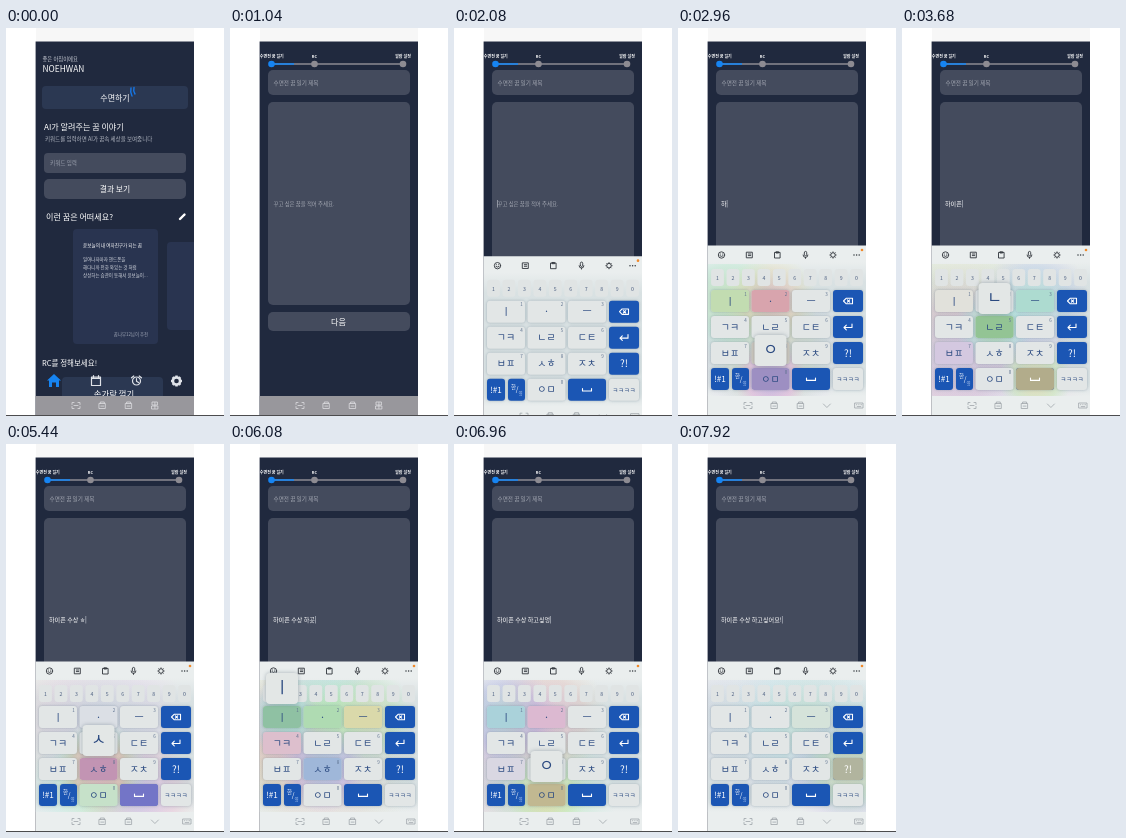
An HTML page with a canvas for the animation above (8 s loop, 218x388 px).

```html
<!DOCTYPE html>
<html lang="ko">
<head>
<meta charset="utf-8">
<style>
html, body { margin: 0; width: 100%; height: 100%; overflow: hidden; background: #fff; }
canvas { display: block; width: 100vw; height: 100vh; }
</style>
</head>
<body>
<canvas id="stage"></canvas>
<script>
const canvas = document.getElementById('stage');
const c = canvas.getContext('2d');
const LOOP = 8000, W = 218, H = 388;
const LEFT = 29.6, TOP = 13.6, WIDE = 158.4;
const FONT = '"Noto Sans CJK KR", "Noto Sans CJK", "Noto Sans", sans-serif';
const NAVY = '#20293e', FIELD = '#444b5d', BLUE = '#1b56b4', INK = '#2b4a80';

const clamp = v => Math.max(0, Math.min(1, v));
const easeOut = v => 1 - (1 - clamp(v)) ** 3;

function box(x, y, w, h, r, fill) {
  c.beginPath();
  c.roundRect(x, y, w, h, r);
  c.fillStyle = fill;
  c.fill();
}

function text(s, x, y, size, fill = '#fff', align = 'left', weight = 400) {
  c.font = `${weight} ${size}px ${FONT}`;
  c.textAlign = align;
  c.textBaseline = 'middle';
  c.fillStyle = fill;
  c.fillText(s, x, y);
}

function dot(x, y, r, fill) {
  c.beginPath();
  c.arc(x, y, r, 0, 7);
  c.fillStyle = fill;
  c.fill();
}

// Stroked icon path centred on (x, y)
function icon(d, x, y, color, width = 1) {
  c.save();
  c.translate(x, y);
  c.strokeStyle = color;
  c.lineWidth = width;
  c.lineJoin = c.lineCap = 'round';
  c.stroke(new Path2D(d));
  c.restore();
}

const circle = r => `M${r} 0A${r} ${r} 0 1 1 ${-r} 0A${r} ${r} 0 1 1 ${r} 0`;
const ICON = {
  calendar: 'M-4.5-4h9v8.5h-9zM-4.5-2.7h9M-2.5-5.5v2M2.5-5.5v2',
  clock: circle(4) + 'M0-2.3V.3L2 1.5M-5-3.2L-2.7-5M5-3.2L2.7-5',
  frame: 'M-4-1v-2h2M2-3h2v2M4 1v2h-2M-2 3h-2v-2M-2 0h4',
  bag: 'M-3-2h6v5h-6zM-2-2v-1.5h4V-2M-1.5.6h3',
  lamp: 'M-2.5-3.5h5v3h-5zM-3 .5h6v3h-6zM0-3v6',
  chevron: 'M-3.5-1.5L0 2L3.5-1.5',
  keys: 'M-4-2.5h8v5h-8zM-2.5-.8h.1M-.8-.8h.1M1-.8h.1M2.5-.8h.1M-1.8 1.1h3.6',
  smile: circle(3.2) + 'M-1.5.8Q0 2.3 1.5.8M-1.1-1v.1M1.1-1v.1',
  note: 'M-2.8-2.8h5.6v5.6h-5.6zM-1.2-1h2.4M-1.2.6h2.4',
  clip: 'M-2.6-2.6h5.2v5.6h-5.2zM-1.2-3.2h2.4v1.2h-2.4z',
  mic: 'M-1.2-2.4a1.2 1.2 0 0 1 2.4 0v2a1.2 1.2 0 0 1-2.4 0zM-2.4 0a2.4 2.4 0 0 0 4.8 0M0 2.4v1',
  back: 'M-4.5 0l2.6-2.7h6.4v5.4h-6.4zM-.6-1.1l2.3 2.3M1.7-1.1l-2.3 2.3',
  enter: 'M4-3v3.5h-8M-1.7-1.8l-2.3 2.3l2.3 2.3',
  space: 'M-4.5-1v2.4h9v-2.4'
};

function gear(x, y, r, color, weight) {
  c.strokeStyle = color;
  c.lineWidth = r * weight;
  c.beginPath();
  c.arc(x, y, r * .65, 0, 7);
  c.stroke();
  for (let i = 0; i < 8; i++) {
    const a = i * Math.PI / 4;
    c.beginPath();
    c.moveTo(x + Math.cos(a) * r * .7, y + Math.sin(a) * r * .7);
    c.lineTo(x + Math.cos(a) * r, y + Math.sin(a) * r);
    c.stroke();
  }
}

function home(t) {
  box(LEFT, TOP, WIDE, H - TOP, 0, NAVY);
  text('좋은 아침이에요', 36.5, 31, 5.3, '#c3c7d0');
  text('NOEHWAN', 36.5, 40.5, 8.4);
  box(36, 58, 146, 23, 4, '#2b3852');
  text('수면하기', 109, 69.5, 8, '#fff', 'center', 500);
  c.globalAlpha = clamp(1 - t / 280);
  icon('M-2-4Q-3 0-1 4M1-4.5Q0-1 2 2', 127, 64, '#1677e8', 1.4);
  c.globalAlpha = 1;

  text('AI가 알려주는 꿈 이야기', 38, 99, 8.1, '#fff', 'left', 500);
  text('키워드를 입력하면 AI가 꿈속 세상을 보여줍니다', 39, 110.5, 5.5, '#b4b9c4');
  box(38, 125, 142, 20, 4, FIELD);
  text('키워드 입력', 44, 135, 5.6, '#9ba1ae');
  box(38, 151, 142, 20, 5, FIELD);
  text('결과 보기', 109, 161, 7.8, '#fff', 'center', 500);

  text('이런 꿈은 어떠세요?', 40, 188.5, 8.1, '#fff', 'left', 500);
  icon('M-2.5 2.5L2 -2', 176.5, 188.5, '#fff', 2.4);
  box(67, 201, 85, 115, 4, '#293450');
  box(161, 214, 27, 88, [4, 0, 0, 4], '#293450');
  text('윤보늘의 내 여자친구가 되는 꿈', 77, 217.5, 4.6, '#fff', 'left', 500);
  ['일어나자마자 핸드폰을', '해다니까 전화 와있는 것 처럼', '상상하는 습관이 동해서 윤보늘이...']
    .forEach((s, i) => text(s, 77, 231.5 + i * 8, 4.5, '#d3d7df'));
  text('꿈나무12님이 추천', 142, 306, 4.4, '#9ca3b3', 'right');

  text('RC를 정해보세요!', 36, 335, 7.5, '#fff', 'left', 500);
  box(56, 349, 101, 39, 4, '#2b3852');
  text('손가락 꺾기', 108, 365.5, 8.4, '#fff', 'center', 500);
  c.fillStyle = '#1684f2';
  c.fill(new Path2D('M48 346L55 352.5H53V359H50V354.5H46V359H43V352.5H41Z'));
  icon(ICON.calendar, 90, 353, '#dfe2e8', 1.2);
  icon(ICON.clock, 130.5, 353, '#dfe2e8', 1.2);
  gear(170.5, 353, 5.5, '#dfe2e8', .45);
}

function diary(entry, caret) {
  box(LEFT, TOP, WIDE, H - TOP, 0, NAVY);
  box(41, 35.3, 132, 1.4, 0, '#8d8b92');
  box(41, 35.2, 23, 1.6, 0, '#1684f2');
  dot(41.5, 36, 3.3, '#1684f2');
  dot(84.5, 36, 3.3, '#8d8b92');
  dot(173, 36, 3.3, '#8d8b92');
  text('수면전 꿈 일기', 41.8, 28, 4, '#fff', 'center', 700);
  text('RC', 84.5, 28, 4, '#fff', 'center', 700);
  text('알람 설정', 173, 28, 4, '#fff', 'center', 700);

  box(38, 42, 142, 25, 5, FIELD);
  text('수면전 꿈 일기 제목', 43.5, 54.5, 5.6, '#a2a6b1');
  box(38, 74, 142, 203, 5, FIELD);
  if (entry) text(entry, 43, 175.5, 6.1);
  else text('꾸고 싶은 꿈을 적어 주세요.', 43.5, 175.5, 5.4, '#a2a6b1');
  if (caret) {
    c.font = `400 6.1px ${FONT}`;
    box(43.2 + c.measureText(entry).width, 172, .6, 7.5, 0, '#c4c8d0');
  }
  box(38, 284, 142, 19, 5, FIELD);
  text('다음', 108.5, 294, 8.1, '#fff', 'center', 500);
}

function navIcons(names, color) {
  names.forEach((n, i) => icon(ICON[n], 70 + i * 26.3, 377.5, color, .8));
}

// Each key: centre, width, blue face or corner number
const keys = {};
const cols = [52, 92.5, 133], rows = [273, 299, 325, 351];
['ㅣ', '·', 'ㅡ', 'ㄱㅋ', 'ㄴㄹ', 'ㄷㅌ', 'ㅂㅍ', 'ㅅㅎ', 'ㅈㅊ'].forEach((k, i) =>
  keys[k] = { x: cols[i % 3], y: rows[i / 3 | 0], w: 38, num: i + 1 });
Object.assign(keys, {
  'ㅇㅁ': { x: 92.5, y: 351, w: 38, num: 0 },
  space: { x: 133, y: 351, w: 38, blue: true },
  back: { x: 170, y: 273, w: 30, blue: true },
  enter: { x: 170, y: 299, w: 30, blue: true },
  '?!': { x: 170, y: 325, w: 30, blue: true },
  '!#1': { x: 42, y: 351, w: 18, blue: true },
  '한/영': { x: 62.5, y: 351, w: 17, blue: true },
  'ㅋㅋㅋㅋ': { x: 170, y: 351, w: 30, small: true }
});

// Time, key, text after the press, light colour hue
const A = '하이픈', B = A + ' 수상', C = B + ' 하고';
const presses = [
  [2440, 'ㅅㅎ', 'ㅅ', 200], [2540, 'ㅅㅎ', 'ㅎ', 30], [2680, 'ㅣ', '히', 95], [2800, '·', '하', 350],
  [2940, 'ㅇㅁ', '하ㅇ', 257], [3030, 'ㅣ', '하이', 40], [3090, 'ㅂㅍ', '하이ㅂ', 190],
  [3170, 'ㅂㅍ', '하이ㅍ', 300], [3430, 'ㅡ', '하이프', 165], [3620, 'ㄴㄹ', A, 120],
  [3660, 'space', A + ' ', 47], [3920, 'ㅅㅎ', A + ' ㅅ', 170], [4100, 'ㅡ', A + ' 스', 350],
  [4270, '·', A + ' 수', 80], [4460, 'ㅅㅎ', A + ' 숫', 33], [4620, 'ㅣ', A + ' 수시', 22],
  [4760, '·', A + ' 수사', 238], [4960, 'ㅇㅁ', B, 120], [5120, 'space', B + ' ', 280],
  [5270, 'ㅅㅎ', B + ' ㅅ', 60], [5360, 'ㅅㅎ', B + ' ㅎ', 310], [5460, 'ㅣ', B + ' 히', 20],
  [5560, '·', B + ' 하', 180], [5680, 'ㄱㅋ', B + ' 학', 335], [5780, '·', B + ' 하ㄱ·', 110],
  [5870, 'ㅡ', C, 58], [5960, 'ㅅㅎ', B + ' 하곳', 215], [6060, 'ㅣ', C + '시', 145],
  [6220, 'ㅂㅍ', C + '십', 20], [6340, 'ㅂㅍ', C + '싶', 260], [6500, 'ㅇㅁ', C + '싶ㅇ', 90],
  [6620, '·', C + '싶ㅇ·', 320], [6740, 'ㅣ', C + '싶어', 190], [6880, 'ㅇㅁ', C + '싶엉', 45],
  [7010, '·', C + '싶어ㅇ·', 230], [7120, '·', C + '싶어ㅇ··', 170], [7300, 'ㅡ', C + '싶어요', 130],
  [7560, '?!', C + '싶어요?', 200], [7740, '?!', C + '싶어요!', 46]
];
const LAG = 32, FADE = 750, POPUP = 100;

// Pastel light that spreads behind the keys after each press
function glow(t) {
  for (const [at, name, , hue] of presses) {
    const age = (t - at) / (FADE * 1.3);
    if (age < 0 || age > 1) continue;
    const k = keys[name], r = 35 + 75 * age, a = 1 - age;
    const g = c.createRadialGradient(k.x, k.y, 4, k.x, k.y, r);
    g.addColorStop(0, `hsla(${hue},60%,74%,${.6 * a})`);
    g.addColorStop(.6, `hsla(${hue + 50},60%,78%,${.45 * a})`);
    g.addColorStop(1, `hsla(${hue + 80},60%,82%,0)`);
    c.fillStyle = g;
    c.fillRect(LEFT, 236, WIDE, 132);
  }
}

function drawKey(name, k, t) {
  const x = k.x - k.w / 2, y = k.y - 11;
  c.save();
  c.shadowColor = 'rgba(70,95,115,.4)';
  c.shadowBlur = 3 * canvas.width / W;
  box(x, y, k.w, 22, 3, k.blue ? BLUE : '#e2e6e6');
  c.restore();
  for (const [at, key, , hue] of presses) {
    const age = (t - at) / FADE;
    if (key !== name || age < 0 || age > 1) continue;
    const held = t - at < POPUP;
    box(x, y, k.w, 22, 3, `hsla(${hue},${held ? 30 : 46}%,${held ? 64 : 70}%,${.95 * (1 - age)})`);
  }
  const ink = k.blue ? '#fff' : INK;
  if (ICON[name]) icon(ICON[name], k.x, k.y, ink, 1.1);
  else if (name === '한/영') {
    text('한', k.x - 3, k.y - 3, 5.5, ink, 'center');
    text('/', k.x + .5, k.y, 7, ink, 'center');
    text('영', k.x + 4, k.y + 4, 4.5, '#a9c4ee', 'center');
  } else text(name, k.x, k.y, k.small ? 6.2 : name === '!#1' ? 8.2 : 10, ink, 'center', k.blue ? 500 : 400);
  if (k.num !== undefined) text(k.num, k.x + 15.5, k.y - 7, 4.5, '#5c708e', 'center');
}

function popup(k, name) {
  c.save();
  c.shadowColor = 'rgba(40,60,80,.35)';
  c.shadowBlur = 4 * canvas.width / W;
  box(k.x - 16, k.y - 44, 32, 31, 4, '#e3e7e6');
  c.restore();
  text(name[0], k.x, k.y - 30, 16, INK, 'center');
}

function keyboard(t, rise) {
  c.save();
  c.translate(0, (1 - rise) * 171);
  box(LEFT, 217.6, WIDE, 171, 0, '#eaeeee');
  const shade = c.createLinearGradient(0, 234, 0, 368);
  shade.addColorStop(0, 'rgba(110,145,155,0)');
  shade.addColorStop(.15, 'rgba(110,145,155,.14)');
  shade.addColorStop(.9, 'rgba(110,145,155,.14)');
  shade.addColorStop(1, 'rgba(110,145,155,0)');
  box(LEFT, 234, WIDE, 134, 0, shade);

  ['smile', 'note', 'clip', 'mic'].forEach((n, i) => icon(ICON[n], 43.5 + i * 28, 227, '#30353b', .9));
  gear(155, 227, 3.5, '#30353b', .27);
  for (let i = 0; i < 3; i++) dot(176 + i * 2.6, 227, .75, '#30353b');
  dot(184, 222, 1.3, '#f08a2c');
  glow(t);
  for (let i = 0; i < 10; i++) {
    const x = 39.5 + i * 15.45;
    box(x - 6.4, 241, 12.8, 17, 3, '#e0e4e4');
    text((i + 1) % 10, x, 250, 5.2, '#4c5f80', 'center');
  }
  for (const name in keys) drawKey(name, keys[name], t);
  for (const [at, name] of presses)
    if (!keys[name].blue && t >= at && t < at + POPUP) popup(keys[name], name);
  navIcons(['frame', 'bag', 'bag', 'chevron'], '#a0a6ab');
  icon(ICON.keys, 181, 377.5, '#a0a6ab', .8);
  c.restore();
}

function draw(t) {
  c.fillStyle = '#fff';
  c.fillRect(0, 0, W, H);
  box(30, 0, 158, TOP, 0, '#f7f7f7');
  c.save();
  c.beginPath();
  c.rect(29, 13, 159, 375);
  c.clip();

  const open = easeOut((t - 320) / 260);
  if (open < 1) home(t);
  if (open > 0) {
    const done = presses.filter(p => p[0] + LAG <= t);
    const last = done.length ? done[done.length - 1] : [1900, '', ''];
    const caret = t > 1900 && (t - last[0]) % 1000 < 500;
    c.save();
    c.globalAlpha = open;
    c.translate(0, 14 * (1 - open));
    diary(last[2], caret);
    c.restore();
  }
  box(LEFT, 368, WIDE, 20, 0, '#98979c');
  navIcons(['frame', 'bag', 'bag', 'lamp'], '#dcdce0');
  const rise = easeOut((t - 1900) / 300);
  if (rise > 0) keyboard(t, rise);
  c.restore();
  box(0, 387, W, 1, 0, '#4c4c4e');
}

function tick() {
  const d = devicePixelRatio || 1;
  const w = Math.round(innerWidth * d), h = Math.round(innerHeight * d);
  if (canvas.width !== w || canvas.height !== h) {
    canvas.width = w;
    canvas.height = h;
  }
  c.setTransform(w / W, 0, 0, h / H, 0, 0);
  draw(performance.now() % LOOP);
  requestAnimationFrame(tick);
}
tick();
</script>
</body>
</html>
```
